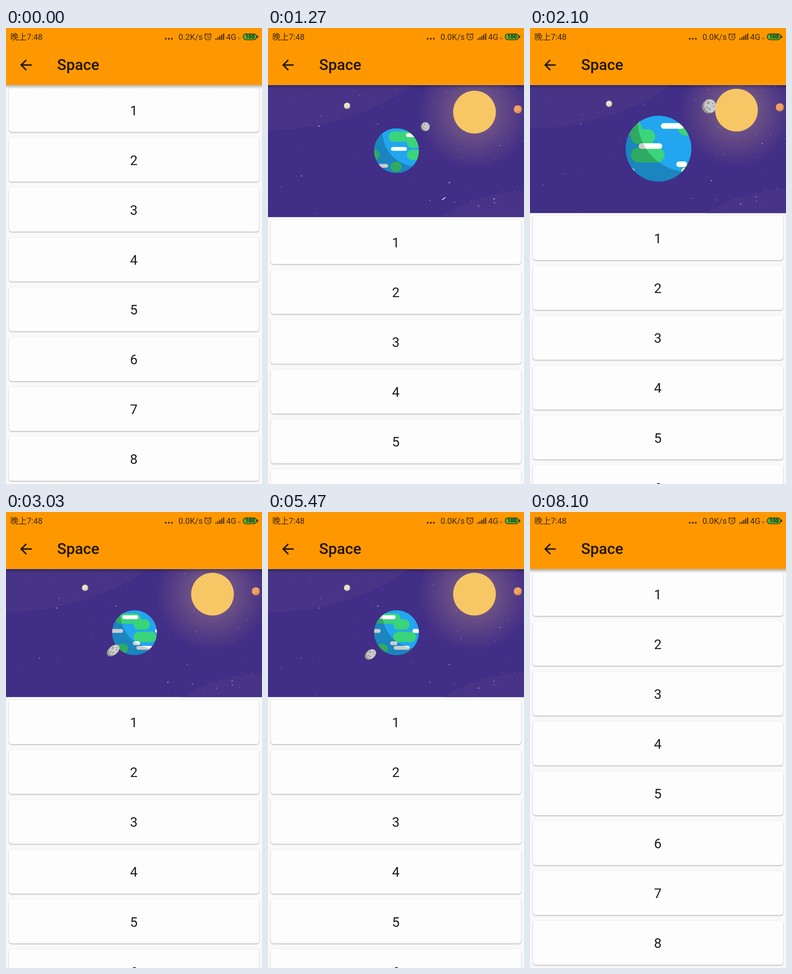
Recreate the animation shown at these times as an HTML page with a canvas. Size 561x998 px, loop 8130 ms.

```html
<!DOCTYPE html>
<html lang="zh">
<head>
<meta charset="utf-8">
<style>
html, body { margin: 0; width: 100%; height: 100%; overflow: hidden; background: #fafafa }
canvas { display: block }
</style>
</head>
<body>
<canvas id="stage" width="561" height="998"></canvas>
<script>
const c = document.getElementById('stage').getContext('2d');
const W = 561, H = 998, DP = W / 360, BAR = 80 * DP, LOOP = 8130, TAU = Math.PI * 2;
const INK = 'rgba(0,0,0,.75)';
const EARTH = 49, MOON = 9.8;

const lin = (t, a, b) => Math.min(1, Math.max(0, (t - a) / (b - a)));
const ramp = (t, a, b) => { const k = lin(t, a, b); return k * k * (3 - 2 * k); };

let seed = 7;
const rnd = () => (seed = seed * 16807 % 2147483647) / 2147483647;
const stars = Array.from({ length: 75 }, () => ({
  x: rnd() * W, y: rnd() * 290 - 145, r: .5 + rnd() ** 4, turn: rnd() * TAU
}));

// Pull down, wait while loading, close
function pose(t) {
  const pull = ramp(t, 530, 1270), close = ramp(t, 5917, 6400);
  const turns = Math.max(0, t - 3030) / 1250;
  const open = lin(t, 1270, 2100), settle = lin(t, 2100, 3030);
  return {
    height: (180 * (pull - close) + 5.6 * (pull - ramp(t, 1350, 1650))) * DP,
    pop: ramp(t, 1350, 1750) - ramp(t, 2150, 2550),
    spin: .227 * pull + .418 * open + .355 * settle + turns + .453 * close,
    orbit: .5 * pull + open + .616 * settle + turns + .694 * close
  };
}

function disc(x, y, r, fill) {
  c.fillStyle = fill;
  c.beginPath();
  c.arc(x, y, r, 0, TAU);
  c.fill();
}
function pill(x, y, w, h, r, fill) {
  c.fillStyle = fill;
  c.beginPath();
  c.roundRect(x, y, w, h, r);
  c.fill();
}
function line(width, color, ...pts) {
  c.lineWidth = width;
  c.strokeStyle = color;
  c.beginPath();
  pts.forEach(p => c.lineTo(p[0], p[1]));
  c.stroke();
}
function text(s, x, y, font, fill = INK, align = 'left') {
  c.font = font + ', sans-serif';
  c.fillStyle = fill;
  c.textAlign = align;
  c.fillText(s, x, y);
}

// Clipped ball; all outside an offset lit circle is darkened
function ball(r, fill, [lx, ly, lr], dark, details) {
  c.save();
  c.beginPath();
  c.arc(0, 0, r, 0, TAU);
  c.clip();
  c.fillStyle = fill;
  c.fillRect(-r, -r, 2 * r, 2 * r);
  if (details) details();
  c.fillStyle = `rgba(0,0,0,${dark})`;
  c.beginPath();
  c.rect(-4 * r, -4 * r, 8 * r, 8 * r);
  c.arc(lx, ly, lr, 0, TAU);
  c.fill('evenodd');
  c.restore();
}

// Pills [x, y, width] that wrap around the globe
function belt(items, h, shift, period, fill) {
  for (const [x, y, w] of items) {
    const first = (x + shift) % period - 2 * period;
    for (let k = 0; k < 4; k++) pill(first + k * period, y, w, h, h / 2, fill);
  }
}

function earth(spin) {
  ball(EARTH, '#22a6ef', [46, -42, 77], .2, () => {
    belt([[-42, -42, 56], [-2, -29, 36], [-2, -2, 50], [-38, 24, 24]], 22.5, spin * 110, 110, '#3ad47a');
    belt([[-27, -38, 35], [-60, -8, 35], [-4, 19, 16], [4, 29, 35]], 8.3, spin * 210, 105, '#fff');
  });
}

function moon(orbit, pop) {
  const a = orbit * TAU, reach = -Math.cos(a) * (1 + .2 * pop);
  const stretch = 1 + .65 * Math.min(1, Math.abs(Math.sin(a)) * 1.5);
  c.save();
  c.translate(63 * reach, -52.5 * reach);
  c.rotate(-.69);
  c.scale(stretch * (1 + .1 * pop), 1 + .05 * pop);
  ball(MOON, '#cbcbc9', [4, 1, 10.5], .27, () => {
    for (let i = 0; i < 5; i++)
      disc(1.5 + 5 * Math.cos(i * 2.4), 5 * Math.sin(i * 2.4), 1.2 + i % 3 * .5, '#a2a2a1');
  });
  c.restore();
}

function planet(x, y, r, fill) {
  c.save();
  c.translate(x, y);
  ball(r, fill, [-.3 * r, -.4 * r, r], .12);
  c.restore();
}

function meteor(age, x, y, len) {
  if (Math.abs(age) > 130) return;
  c.save();
  c.translate(x - age * .3, y + age * .2);
  c.lineCap = 'round';
  line(1.6, '#fff', [-len, len * .67], [len, -len * .67]);
  c.restore();
}

function hill(x, y, bend, endX, endY, cornerX, cornerY) {
  c.fillStyle = '#473487';
  c.beginPath();
  c.moveTo(x, y);
  c.quadraticCurveTo(...bend, endX, endY);
  c.lineTo(cornerX, cornerY);
  c.fill();
}

function scene(t, { height, pop, spin, orbit }) {
  c.save();
  c.beginPath();
  c.rect(0, BAR, W, height);
  c.clip();
  c.fillStyle = '#412e86';
  c.fillRect(0, BAR, W, height);
  c.translate(0, BAR + height / 2);
  hill(0, -45, [185, -48], 325, -150, 0, -150);
  hill(372, 150, [450, 92], W, 87, W, 150);

  const glow = c.createRadialGradient(452, -85, 45, 452, -85, 125);
  glow.addColorStop(0, 'rgba(240,190,130,.25)');
  glow.addColorStop(1, 'rgba(240,170,130,0)');
  c.fillStyle = glow;
  c.fillRect(320, -215, W, 260);

  for (const s of stars)
    disc(s.x, s.y, s.r, `rgba(255,255,255,${.5 + .2 * Math.sin(t / 500 + s.turn)})`);
  disc(452.5, -85.2, 46.8, '#f7c765');
  planet(173.3, -99, 7, '#e9e2c6');
  planet(547.5, -91.3, 9, '#f5a064');
  meteor(t - 1285, 381, 107, 3.5);
  meteor(t - 4350, 208.5, -108, 6.5);

  const size = 1 + .47 * pop;
  c.translate(281.6, -.8);
  c.scale(size, size);
  const layers = [() => earth(spin), () => moon(orbit, pop)];
  if (orbit % 1 > .5) layers.reverse();
  layers.forEach(draw => draw());
  c.restore();
}

function list(top) {
  for (let i = 0; i < 8; i++) {
    const y = top + i * 70 * DP;
    c.save();
    c.shadowColor = 'rgba(0,0,0,.32)';
    c.shadowBlur = 2.5;
    c.shadowOffsetY = 1.2;
    pill(4 * DP, y + 4 * DP, 352 * DP, 62 * DP, 4 * DP, '#fdfdfd');
    c.restore();
    text(i + 1, 280, y + 66, '29.5px Roboto', '#1c1c1c', 'center');
  }
}

function alarm(x, y) {
  c.save();
  c.translate(x, y);
  c.lineWidth = 1.4;
  c.strokeStyle = INK;
  c.beginPath();
  c.arc(0, 0, 6.6, 0, TAU);
  c.stroke();
  line(1.4, INK, [0, -4], [0, .5], [3, 2]);
  for (const side of [-1, 1]) line(1.5, INK, [side * 8, -4.7], [side * 4, -8]);
  c.restore();
}

function statusBar(t) {
  const font = '18px Roboto, "Noto Sans CJK SC", "Noto Sans CJK"';
  text('晚上7:48', 9.5, 26, font);
  for (let i = 0; i < 3; i++) disc(350 + i * 6.7, 23.5, 2, INK);
  text(t < 530 ? '0.2K/s' : '0.0K/s', 378, 26, font);
  alarm(442.5, 19.7);
  c.fillStyle = INK;
  for (let i = 0; i < 5; i++) c.fillRect(459 + i * 4.2, 23 - i * 2.8, 2.4, 3 + i * 2.8);
  text('4G', 482.5, 26, font);
  for (const x of [509.5, 512.5]) line(1.2, 'rgba(0,0,0,.45)', [x, 20], [x, 25]);
  pill(519, 12, 31, 14.5, 7, '#3a3110');
  pill(520.6, 13.6, 27.8, 11.3, 5.6, '#5cb531');
  pill(550, 16.5, 2.5, 5.5, 1, '#3a3110');
  text('100', 534.8, 23.4, 'bold 12px Roboto', '#14200a', 'center');
}

function appBar(t) {
  const fade = c.createLinearGradient(0, BAR, 0, BAR + 11);
  for (let k = 0; k <= 1; k += .25) fade.addColorStop(k, `rgba(0,0,0,${.34 * (1 - k) ** 2})`);
  c.fillStyle = fade;
  c.fillRect(0, BAR, W, 11);
  c.fillStyle = '#ff9800';
  c.fillRect(0, 0, W, BAR);
  line(3.1, '#1d1403', [44.5, 69.8], [33.3, 81], [44.5, 92.2]);
  line(3.1, '#1d1403', [33, 81], [56.5, 81]);
  text('Space', 112, 91.5, '500 33.4px Roboto', '#211603');
  statusBar(t);
}

function frame(now) {
  const t = now % LOOP, p = pose(t);
  c.fillStyle = '#f8f9f8';
  c.fillRect(0, 0, W, H);
  if (p.height > 0) scene(t, p);
  list(BAR + p.height);
  appBar(t);
  requestAnimationFrame(frame);
}
requestAnimationFrame(frame);
</script>
</body>
</html>
```
